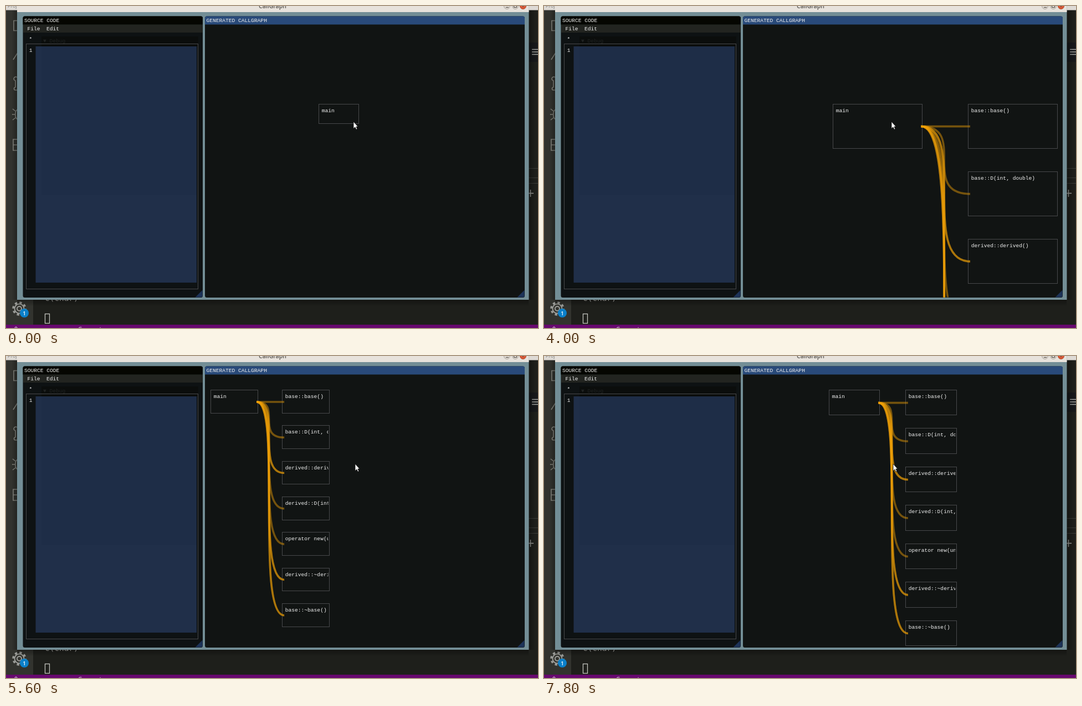
An HTML page for the animation above (8000 ms loop, 960x582 px).

```html
<!DOCTYPE html>
<html lang="en">
<head>
<meta charset="utf-8">
<title>Call graph</title>
<style>
html, body { margin: 0; width: 100%; height: 100%; overflow: hidden; background: #1e1f1b; }
svg { display: block; }
.mono { font: 9.6px "Liberation Mono", monospace; fill: #f2f2f2; white-space: pre; }
.line { fill: none; stroke: #48494b; }
.icon { fill: none; stroke: #85867f; stroke-width: 1.6; }
.edge { fill: none; stroke: #f0a008; stroke-opacity: .45; stroke-width: 3.6; }
</style>
</head>
<body>
<svg id="stage" width="960" height="582" viewBox="0 0 960 582">
  <defs>
    <clipPath id="panel"><rect x="361" y="34" width="572.5" height="492.5"/></clipPath>
    <linearGradient id="shadeL"><stop offset="0" stop-color="#000" stop-opacity="0"/><stop offset="1" stop-color="#000" stop-opacity=".3"/></linearGradient>
    <linearGradient id="shadeR"><stop offset="0" stop-color="#000" stop-opacity=".35"/><stop offset="1" stop-color="#000" stop-opacity="0"/></linearGradient>
    <linearGradient id="shadeB" x2="0" y2="1"><stop offset="0" stop-color="#000" stop-opacity=".35"/><stop offset="1" stop-color="#000" stop-opacity="0"/></linearGradient>
  </defs>

  <!-- editor behind the window -->
  <rect width="960" height="582" fill="#1e1f1b"/>
  <rect width="49" height="582" fill="#32332e"/>
  <rect x="943" y="66" width="17" height="35" fill="#17181a"/>
  <path d="M943 293.5h17M943 310.5h17M943 320.5h17" stroke="#3a3b37"/>
  <path d="M949 78.5h11M949 83h11M949 87.5h11M940 338.5h12M946.5 332v13" stroke="#a5a6a2" stroke-width="1.4"/>
  <g class="icon">
    <path d="M22 26.500h-8v18h8M13 97l9-14M22 152h-5a2.500 2.500 0 1 1 0-5M17 147v-12a3.500 3.500 0 1 1 3-6"/>
    <path d="M12 186l5 4M11 196h6M12 206l5-4M22 187c-7 1-7 16 0 18M22 241h-9v20h9M13 251h9"/>
  </g>
  <g fill="none" stroke="#9b9c98">
    <circle cx="24" cy="547" r="4" stroke-width="2"/>
    <circle cx="24" cy="547" r="8.500" stroke-width="2"/>
    <circle cx="24" cy="547" r="11" stroke-width="3.500" stroke-dasharray="4.320"/>
  </g>
  <circle cx="33" cy="555" r="8" fill="#0b80c9"/>
  <text x="33" y="558.500" text-anchor="middle" font-family="Open Sans, sans-serif" font-size="9.500" font-weight="600" fill="#fff">1</text>
  <text x="70" y="533" font-family="DejaVu Sans Mono, monospace" font-size="14.400" fill="#b8b9b4">c(char)</text>
  <rect x="70.500" y="556.500" width="8" height="17" fill="none" stroke="#c2c3be" stroke-width="1.300"/>
  <rect y="576" width="960" height="6" fill="#67086e"/>
  <g font-family="Open Sans, sans-serif" font-size="11" fill="#e8d5ea">
    <circle cx="18" cy="582" r="2" fill="none" stroke="#e8d5ea"/>
    <text x="130" y="588">Connect</text>
  </g>
  <rect width="960" height="7.500" fill="#dedad5"/>
  <text x="3" y="3" font-family="Open Sans, sans-serif" font-size="9" fill="#888">Proj</text>

  <!-- window frame -->
  <rect x="10" y="8" width="10" height="523" fill="url(#shadeL)"/>
  <rect x="943" y="8" width="12" height="523" fill="url(#shadeR)"/>
  <rect x="20" y="531" width="923" height="12" fill="url(#shadeB)"/>
  <rect x="20" width="923.500" height="531" fill="#738e96"/>
  <rect x="20" width="923.500" height="11" fill="#e7e2dc"/>
  <text x="481" y="3.500" text-anchor="middle" font-family="Open Sans, sans-serif" font-size="10.500" font-weight="600" fill="#55524e">CallGraph</text>
  <g fill="#dcd6cf" stroke="#aaa49c">
    <circle cx="904" cy="0" r="5.500"/><circle cx="919" cy="0" r="5.500"/>
    <circle cx="933" cy="0" r="5.500" fill="#e45a35" stroke="#a8452b"/>
  </g>
  <path d="M902 2.500h5M916.500 0v2.500h5V0M931 2.500l2-2 2 2" fill="none" stroke="#4a4642"/>

  <!-- source panel -->
  <rect x="30.500" y="18.500" width="324.500" height="508.500" rx="3.500" fill="#0e1213"/>
  <path d="M30.500 33.500V22a3.500 3.500 0 0 1 3.500-3.500h317.500a3.500 3.500 0 0 1 3.500 3.500v11.500z" fill="#050601"/>
  <rect x="31" y="33.500" width="323.500" height="14.500" fill="#222420"/>
  <rect x="64" y="55" width="283" height="18" fill="#0b0d0c"/>
  <text x="67" y="65.500" class="mono" style="fill:#202322">▼ Debug</text>
  <rect x="53.500" y="73" width="290.500" height="427" fill="#202f49"/>
  <rect x="64" y="73" width="280" height="269" fill="#1e2d47"/>
  <rect x="36.500" y="68.500" width="310" height="443" class="line"/>
  <path d="M341.500 526.500L354.500 513.500V523.500a3 3 0 0 1-3 3z" fill="#1d3359"/>
  <g class="mono">
    <text x="33" y="29">SOURCE CODE</text>
    <text x="38.500" y="44.300">File</text>
    <text x="73" y="44.300">Edit</text>
    <text x="41.500" y="62.500">*</text>
    <text x="41.700" y="82.500">1</text>
  </g>

  <!-- graph panel -->
  <rect x="359" y="18.500" width="577" height="508.500" rx="3.500" fill="#111413"/>
  <path d="M359 33.500V22a3.500 3.500 0 0 1 3.500-3.500h370h200a3.500 3.500 0 0 1 3.500 3.500v11.500z" fill="#294a7a"/>
  <path d="M922.500 526.500L935.500 513.500V523.500a3 3 0 0 1-3 3z" fill="#1d3359"/>
  <text x="361.500" y="29" class="mono">GENERATED CALLGRAPH</text>
  <g id="graph" clip-path="url(#panel)"></g>
  <path id="pointer" d="M0 0v12.500l2.900-2.600 2.100 4.300 1.900-.9-2-4.200h3.300z" fill="#fff" stroke="#111" stroke-width=".8"/>
</svg>
<script>
const LOOP = 8000, STEP = 200;
const graph = document.getElementById("graph");
const pointer = document.getElementById("pointer");

// label and number of calls from main
const calls = [
  ["base::base()", 1], ["base::D(int, double)", 1], ["derived::derived()", 2],
  ["derived::D(int, double)", 1], ["operator new(unsigned long)", 1],
  ["derived::~derived()", 2], ["base::~base()", 2]
];

// start time, number of steps, then x, y and column spacing reached
const start = [564, 177, 109.2];
const moves = [
  [400, 6, 564, 177, 139], [1600, 1, 564, 177, 166], [2200, 3, 564, 177, 244],
  [4000, 1, 521, 177, 244], [4200, 4, 369.5, 61.5, 244], [5000, 1, 369.5, 61.5, 175],
  [5200, 3, 369.5, 61.5, 128.6], [5800, 2, 369.5, 61.5, 115], [6400, 1, 369.5, 61.5, 109.7],
  [6600, 2, 369.5, 61.5, 134.7], [7400, 1, 418, 61.5, 138.9], [7600, 2, 514, 61.5, 138.9]
];

function add(tag, attrs, parent) {
  const el = document.createElementNS("http://www.w3.org/2000/svg", tag);
  set(el, attrs);
  return parent.appendChild(el);
}
function set(el, attrs) {
  for (const k in attrs) el.setAttribute(k, attrs[k]);
}

function makeNode(label, parent) {
  const box = add("rect", { class: "line" }, parent);
  const view = add("svg", { overflow: "hidden" }, parent);
  add("text", { class: "mono", x: 5.3, y: 14 }, view).textContent = label;
  return { box, view };
}

const main = makeNode("main", graph);
const callees = add("g", {}, graph);
const nodes = calls.map(([label]) => makeNode(label, callees));
const edges = calls.map(([, n]) =>
  Array.from({ length: n }, () => add("path", { class: "edge" }, callees)));

const snap = v => Math.floor(v) + .5;

function place(node, x, y, s) {
  const left = snap(x), top = snap(y);
  const width = snap(x + s * 2 / 3 - .8) - left;
  const height = snap(y + s / 3 - 1) - top;
  const area = { x: left, y: top, width, height };
  set(node.box, area);
  set(node.view, { ...area, width: width - 2 });
}

function camera(t) {
  let pos = start;
  for (const [begin, steps, ...goal] of moves) {
    if (t < begin) break;
    const k = Math.min(1, (Math.floor((t - begin) / STEP) + 1) / steps);
    const [x, y, s] = pos;
    pos = [x + (goal[0] - x) * k, y + (goal[1] - y) * k, s * (goal[2] / s) ** k];
  }
  return pos;
}

function render(t) {
  const [x, y, s] = camera(t);
  place(main, x, y, s);
  set(callees, { visibility: t >= 3000 ? "visible" : "hidden" });
  const x0 = x + s * 2 / 3 - 3, x1 = x + s + 4, y0 = y + s / 6;
  nodes.forEach((node, i) => {
    const drop = i * s / 2;
    place(node, x + s, y + drop, s);
    const y1 = y0 + drop;
    const d = `M${x0} ${y0}C${x1 - 4} ${y0} ${x0 - 3} ${y1} ${x1} ${y1}`;
    edges[i].forEach(e => set(e, { d }));
  });
  set(pointer, { transform: t < 4600 ? "translate(627 209)" : "translate(630 195)" });
}

const origin = performance.now();
function tick() {
  render((performance.now() - origin) % LOOP);
  requestAnimationFrame(tick);
}
tick();
</script>
</body>
</html>
```
